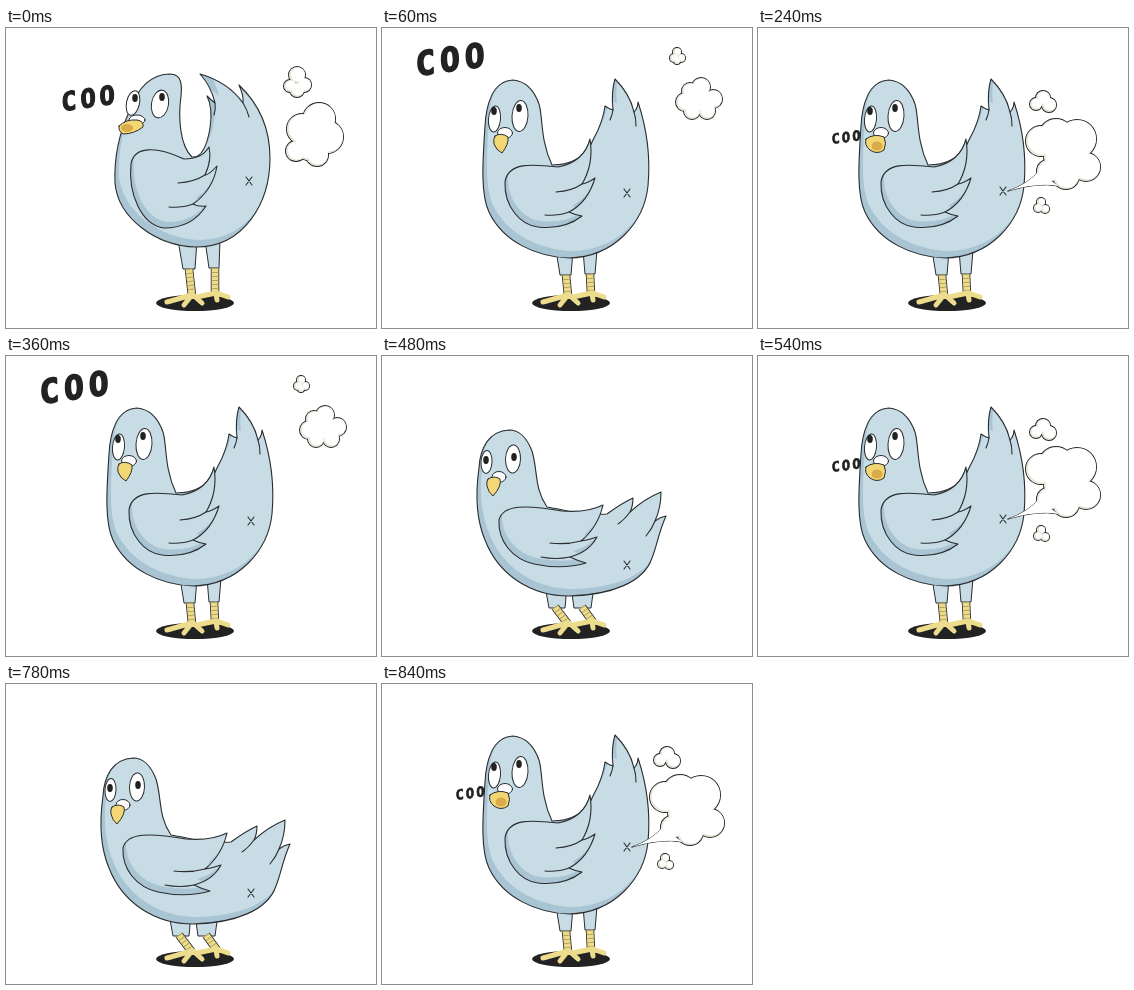
An HTML page that plays this animation: 370x300 px, repeating every 900 ms.

```html
<!DOCTYPE html>
<html lang="en">
<head>
<meta charset="utf-8">
<title>Cooing pigeon</title>
<style>
html, body { margin: 0; width: 100%; height: 100%; overflow: hidden; background: #fff; }
svg { display: block; width: 370px; height: 300px; stroke-linejoin: round; stroke-linecap: round; }
.pose { visibility: hidden; }
.light { fill: #c8dce6; }
.shade { fill: #a9c4d2; }
.line { fill: none; stroke: #2a2d30; stroke-width: 1.1; }
.ink { stroke: #2a2d30; stroke-width: 1; }
.dark { fill: #222; }
.white { fill: #fff; }
.cream { fill: #e9e6da; }
.beak { fill: #f3d774; }
.leg { fill: none; stroke: #2a2d30; stroke-width: 8.5; stroke-linecap: butt; }
.skin { stroke: #ecdc8c; stroke-width: 6.8; }
.rings { stroke: #b5a45a; stroke-dasharray: 1 3; }
.toe { fill: none; stroke: #ecdc8c; stroke-width: 5; }
text { font: bold 33px "DejaVu Sans Mono", monospace; letter-spacing: 5px; text-anchor: middle;
  fill: #222; stroke: #222; stroke-width: 1.5; }
</style>
</head>
<body>
<svg id="stage" viewBox="0 0 370 300"></svg>
<script>
const STEP = 60;

// All poses share one path structure, so they can be blended number by number.
const tall = {
  body: 'M186 129C174 118 172 90 175 68C177 50 172 46 163 46C142 47 131 62 124 82C113 105 108 130 109 155C112 190 150 218 190 219C238 219 264 175 264 130C264 100 253 76 233 57Q238 68 237 75Q222 54 194 46Q205 58 209 75Q205 72 201 68Q207 80 204 100C201 118 196 130 186 129Z',
  wing: 'M203 119Q196 131 178 131C150 118 128 118 125 136C122 165 135 197 158 200Q186 200 200 178Q192 179 187 176Q207 162 211 138Q204 146 199 147Q206 132 203 119Z',
  lines: 'M199 147Q188 154 172 155M187 176Q176 180 163 179M237 75Q241 81 243 89M209 75Q210 81 208 87',
  thighs: 'M172 212L177 241H189L191 212ZM199 212L203 240H213L214 212Z',
  shins: 'M183 241L186 268M209 240L209 266',
  eyes: '127 75 6.5 12.5 12 129 70 154 76 8.5 14 10 156 69',
  cere: '131 92 8 5',
  beak: 'M113 98Q120 91 131 92Q138 93 137 99Q128 106 117 106Q112 103 113 98Z',
  mouth: '121 100 6 4',
  vent: '243 153'
};
const mid = {
  body: 'M170 137C158 112 161 88 157 76C151 59 142 53 131 52C110 53 104 78 103 98C101 130 98 165 107 184C121 214 155 229 187 230C232 229 262 195 266 158C269 125 264 98 256 74Q256 80 252 84Q248 66 233 51Q229 64 231 82Q227 81 223 78Q221 94 211 112C205 128 190 137 170 137Z',
  wing: 'M208 111Q202 134 176 139C150 136 126 134 123 154C122 178 138 197 156 199Q182 202 200 188Q193 187 187 184Q206 174 213 150Q206 155 200 156Q212 136 208 111Z',
  lines: 'M200 156Q190 163 174 164M187 184Q176 188 163 187M252 84Q254 90 254 98M231 82Q230 88 228 92',
  thighs: 'M174 222L178 247H189L191 222ZM201 222L203 246H213L215 222Z',
  shins: 'M184 247L186 268M208 246L209 266',
  eyes: '112.5 91 6 13 5 112 83 138 88 8 15.5 4 137 80',
  cere: '123 105 7.5 5.5',
  beak: 'M113 108Q119 104 126 109Q127 116 120 125Q114 122 112 116Q111 111 113 108Z',
  mouth: '119 118 0 0',
  vent: '245 165'
};
const squat = {
  body: 'M165 151C152 132 156 115 150 95C144 80 137 74 127 74C107 75 98 92 97 112C93 140 95 165 103 184C117 220 150 240 187 240C230 239 262 226 270 202C275 190 276 178 284 160Q278 161 273 165Q279 152 279 136Q262 143 248 156Q251 150 251 142Q240 147 225 158C205 160 188 155 165 151Z',
  wing: 'M221 149Q205 157 180 155C145 149 121 148 117 164C116 185 130 203 152 208Q180 214 204 207Q196 205 188 201Q207 196 215 181Q207 184 199 185Q216 171 221 149Z',
  lines: 'M199 185Q184 189 168 187M188 201Q174 204 159 201M273 165Q270 173 264 180M248 156Q242 164 236 168',
  thighs: 'M163 230L167 252H183L185 230ZM189 230L192 252H209L212 230Z',
  shins: 'M173 251L186 268M200 251L211 266',
  eyes: '104.5 106 5.5 11.5 3 104 104 131 103 7.5 14 2 132 101',
  cere: '117 121 7 5.5',
  beak: 'M106 123Q112 119 118 123Q120 130 111 140Q106 136 105 130Q104 126 106 123Z',
  mouth: '112 132 0 0',
  vent: '245 209'
};
const calling = {
  ...mid,
  beak: 'M108 111Q116 105 126 109Q129 115 126 122Q119 127 112 122Q106 117 108 111Z',
  mouth: '119 118 5.5 4.5',
  vent: '245 163'
};

function blend(a, b, t) {
  const out = {};
  for (const key in a) {
    const target = b[key].match(/[\d.]+/g);
    let i = 0;
    out[key] = a[key].replace(/[\d.]+/g, n => +n + (target[i++] - n) * t);
  }
  return out;
}

const nums = s => s.split(' ').map(Number);
const path = (d, cls, extra = '') => `<path d="${d}" class="${cls}" ${extra}/>`;
const oval = (x, y, rx, ry, cls, turn = 0) =>
  `<ellipse cx="${x}" cy="${y}" rx="${rx}" ry="${ry}" class="${cls}" transform="rotate(${turn} ${x} ${y})"/>`;

function shaded(d, id, dx, dy) {
  return `<clipPath id="${id}"><path d="${d}"/></clipPath>` + path(d, 'shade') +
    `<g clip-path="url(#${id})">${path(d, 'light', `transform="translate(${dx} ${dy})"`)}</g>` +
    path(d, 'line');
}

function bird(p, id) {
  const [x, y] = nums(p.vent);
  const e = nums(p.eyes);
  const eye = ([cx, cy, rx, ry, turn, px, py]) =>
    oval(cx, cy, rx, ry, 'white ink', turn) + oval(px, py, 2.8, 4, 'dark');
  return oval(189, 275, 39, 8, 'dark') +
    path(p.thighs, 'light ink') +
    path(p.shins, 'leg') + path(p.shins, 'leg skin') + path(p.shins, 'leg skin rings') +
    path('M186 267L161 274M186 267L178 277M187 267L196 275M210 265L191 269M210 265L211 272M211 265L222 269', 'toe') +
    shaded(p.body, 'body' + id, 4, -7) +
    shaded(p.wing, 'wing' + id, 3, -6) +
    path(p.lines, 'line') +
    path(`M${x - 3} ${y - 4}l6 8m0 -8l-6 8`, 'line') +
    eye(e.slice(0, 7)) + eye(e.slice(7)) +
    oval(...nums(p.cere), 'white ink') +
    path(p.beak, 'beak ink') +
    `<g fill="#d8aa48">${oval(...nums(p.mouth), '')}</g>`;
}

// Overlapping discs, with an optional jet, make one outlined cloud.
function cloud(discs, jet = '') {
  const layer = (cls, inset, dx, dy) =>
    discs.map(([x, y, r]) => oval(x + dx, y + dy, r - inset, r - inset, cls)).join('');
  return path(jet, 'white ink') + layer('dark', 0, 0, 0) +
    layer('cream', 0.9, 0, 0) + layer('white', 2, 0.9, -0.6) + path(jet, 'white');
}

const coo = (x, y, size) =>
  `<text transform="translate(${x} ${y}) rotate(-8) scale(${size}) skewX(-6)" x="2.5" y="12">COO</text>`;

const poses = [
  bird(tall, 0) + coo(82, 70, 0.78) +
    cloud([[313, 91, 17], [296, 101, 16], [321, 109, 17], [303, 117, 16], [290, 123, 11], [311, 127, 12]]) +
    cloud([[291, 47, 9], [284, 58, 7], [298, 57, 8], [291, 62, 8]]),
  bird(mid, 1) + coo(68, 31, 1) +
    cloud([[319, 59, 10], [308, 63, 9], [331, 71, 10], [303, 74, 10], [310, 83, 9], [325, 83, 9], [318, 72, 12]]) +
    cloud([[295, 24, 5], [292, 30, 5], [299, 30, 5], [295, 33, 4]]),
  bird(blend(mid, squat, 0.5), 2),
  bird(squat, 3),
  bird(calling, 4) + coo(88, 109, 0.42) +
    cloud([[283, 113, 16], [298, 108, 18], [319, 111, 20], [328, 139, 15], [308, 148, 14], [290, 143, 12], [305, 128, 20]],
      'M250 163Q270 156 281 143L300 158Q280 154 250 163Z') +
    cloud([[285, 70, 8], [278, 76, 7], [291, 77, 8]]) +
    cloud([[283, 174, 5], [280, 180, 5], [287, 181, 5]])
];

const stage = document.getElementById('stage');
stage.innerHTML = poses.map(p => `<g class="pose">${p}</g>`).join('');
const groups = stage.querySelectorAll('.pose');
const start = performance.now();

function draw(now) {
  const current = Math.floor(Math.max(0, now - start) / STEP) % groups.length;
  groups.forEach((g, i) => g.style.visibility = i === current ? 'visible' : 'hidden');
  requestAnimationFrame(draw);
}
draw(start);
</script>
</body>
</html>
```
